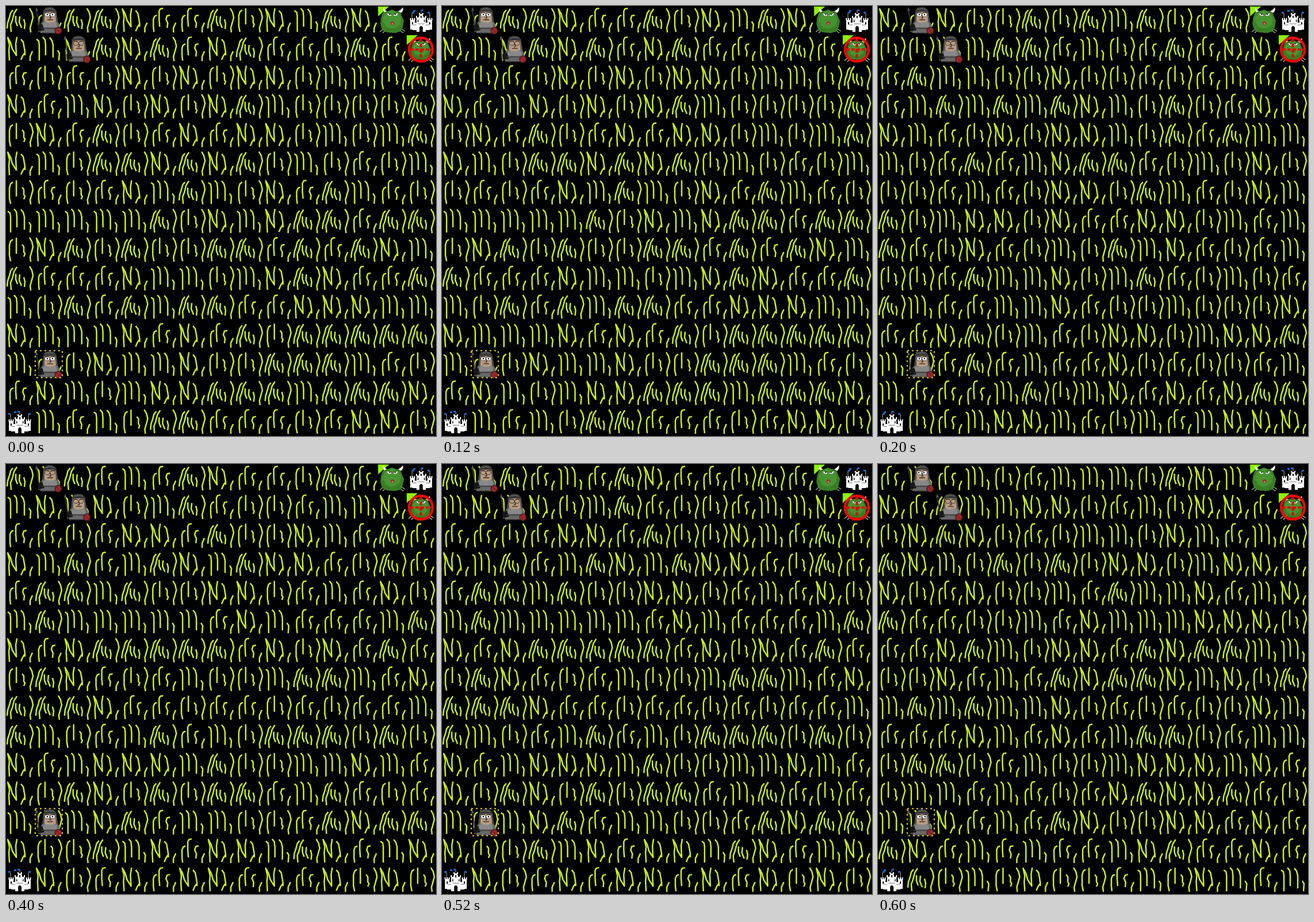
Animation of 748x748 px, one loop 0.8 s. Source, as an HTML page with a canvas:

```html
<!DOCTYPE html>
<html lang="en">
<head>
<meta charset="utf-8">
<title>Battle field</title>
<style>
  html, body { margin: 0; width: 100%; height: 100%; overflow: hidden; background: #000; }
  canvas { display: block; width: 748px; height: 748px; }
</style>
</head>
<body>
<canvas id="stage" width="748" height="748"></canvas>
<script>
const ctx = document.getElementById('stage').getContext('2d');
const SIZE = 748, CELLS = 15, PITCH = SIZE / CELLS;
const STEP = 200, STEPS = 4;

// Grass tufts, each on a 50 x 50 tile
const SHORT = 'M42 46L42 38L46 29';
const TALL = 'M41 4L45 11L47 20L44 31L42 38L43 46';
const TUFTS = [
  'M8 45L7 36L7 23L9 18L13 16M18 36L17 23L17 9L19 5L24 4M31 38L32 30L29 23L31 17L36 16' + SHORT,
  'M8 45L6 35L6 17L8 10L12 7M18 32L18 4M28 16L31 20L31 29L33 32L31 37' + TALL,
  'M6 45L5 28L6 18L3 5L8 14L11 25L18 36L17 16L19 4M26 8L30 13L32 24L33 31L29 37L26 44M33 30L33 36' + SHORT,
  'M2 39L3 29L6 20L8 12L12 7M9 45L8 33L11 25L14 13L19 5M17 17L17 27L20 35M24 18L23 28L27 38M31 23L33 31L32 40' + TALL,
  'M3 8L7 11L8 18L8 45M14 4L18 9L19 18L19 36M26 5L30 10L32 18L32 40M40 27L43 32L42 45'
].map(d => new Path2D(d));

function random(seed) {
  return () => {
    seed = (seed + 0x6d2b79f5) | 0;
    let n = Math.imul(seed ^ (seed >>> 15), 1 | seed);
    n ^= n + Math.imul(n ^ (n >>> 7), 61 | n);
    return ((n ^ (n >>> 14)) >>> 0) / 4294967296;
  };
}

function rect(color, x, y, w, h) {
  ctx.fillStyle = color;
  ctx.fillRect(x, y, w, h);
}

function fill(color, d) {
  ctx.fillStyle = color;
  ctx.fill(new Path2D(d));
}

function line(color, width, d) {
  ctx.strokeStyle = color;
  ctx.lineWidth = width;
  ctx.stroke(new Path2D(d));
}

function oval(color, x, y, rx, ry = rx) {
  ctx.fillStyle = color;
  ctx.beginPath();
  ctx.ellipse(x, y, rx, ry, 0, 0, 7);
  ctx.fill();
}

function at(col, row, draw) {
  ctx.save();
  ctx.translate(col * PITCH, row * PITCH);
  draw();
  ctx.restore();
}

function knight(look, shut) {
  line('#333', 2, 'M3 6L9 45');
  fill('#555', 'M1 9L3 2L6 8Z');
  fill('#4b4b4b', 'M13 30L15 11Q17 2 26 2Q36 2 38 11L41 30Z');
  fill('#686868', 'M10 47L9 35Q11 27 18 26H36Q43 28 44 36L43 47Z');
  fill('#888', 'M15 29Q26 25 38 29L39 37H14Z');
  fill('#171717', 'M5 34L13 31L17 42L6 44Z');
  fill('#b89b82', 'M17 10H36L37 27Q27 31 17 27Z');
  fill('#383838', 'M14 11Q17 2 26 2Q36 2 39 11L35 10H18Z');
  line('#777', 1, 'M19 6Q26 3 34 6');
  for (const x of [22, 31]) {
    oval('#302820', x, 15, 4.6, 4);
    oval(shut ? '#b89b82' : '#fff', x, 15, 3.8, 3.2);
    if (!shut) oval('#111', x + look, 15, 1.3);
  }
  line('#30251d', 1.3, 'M17 11L25 12M28 12L36 11M27 16L28 21L25 21M22 24H32');
  line('#3b3b3b', 1.5, 'M12 39H42M13 47H42');
  oval('#471818', 41, 43, 6.5);
  oval('#9e272d', 41, 43, 5);
  line('#471818', 1, 'M38 40L44 46');
}

function monster(scale) {
  fill('#8cf500', 'M-1 1H18L-1 18Z');
  line('#aaa792', 1.5, 'M2 45L9 39M7 47L13 41M35 41L43 47M37 38L46 44');
  ctx.save();
  ctx.translate(23, 26);
  ctx.scale(scale, scale);
  fill('#398024', 'M-16 -13L-13 -18L-7 -17L0 -20L7 -17L14 -17L17 -9L21 0L19 10L16 18L6 21L-8 20L-17 16L-20 5L-19 -5Z');
  oval('#479331', 0, -2, 16, 15);
  line('#2f701f', 1, 'M-15 3L-12 7M-11 14L-6 17M8 16L14 12M14 0L18 3');
  fill('#f4f4e8', 'M-13 -15Q-17 -18 -14 -24Q-13 -19 -9 -17ZM11 -17Q16 -19 19 -24Q21 -18 16 -14Z');
  fill('#fff', 'M-9 -14L0 -11Q-3 -7 -7 -10ZM2 -11L11 -14L9 -10Q5 -7 2 -11Z');
  line('#204912', 1.2, 'M-10 -15L0 -11M2 -11L12 -15');
  oval('#111', -4, -11, 1);
  oval('#111', 6, -11, 1);
  oval('#8c3427', 1, 4, 3.5, 3);
  oval('#d48a72', 1, 5, 1.8, 1.3);
  ctx.restore();
}

function target() {
  ctx.strokeStyle = '#f00808';
  ctx.lineWidth = 4.5;
  ctx.beginPath();
  ctx.arc(23.5, 26, 20.5, 0, 7);
  ctx.stroke();
  ctx.setLineDash([6, 3]);
  line('#e00808', 4, 'M23.5 7V45M5 26H43');
  ctx.setLineDash([]);
}

function castle(wave) {
  line('#aaa', 1, 'M8 22V12M24 13V7M39 22V12');
  [[8, 10], [14, 7], [24, 6], [39, 10]].forEach(([x, y], i) =>
    rect('#1769cf', x - ((wave + i) % 2 ? 4 : 0), y, 4, 3));
  rect('#fff', 9, 29, 30, 13);
  for (const x of [5, 35]) {
    rect('#fff', x, 24, 8, 17);
    for (let i = 0; i < 3; i++) rect('#fff', x + i * 3.5 - 0.5, 21, 2, 4);
    rect('#111', x + 3, 28, 2, 4);
  }
  for (const x of [16, 27]) {
    rect('#fff', x, 20, 5, 25);
    rect('#fff', x - 1, 17, 2, 4);
    rect('#fff', x + 4, 17, 2, 4);
    rect('#111', x + 2, 24, 1.5, 4);
  }
  rect('#fff', 21, 14, 6, 29);
  rect('#fff', 20, 12, 2, 3);
  rect('#fff', 26, 12, 2, 3);
  rect('#111', 23, 17, 2, 4);
  fill('#111', 'M21 45V37Q24 32 27 37V45Z');
  line('#777', 1, 'M9 33H16M32 33H39M18 31H30');
}

function selection() {
  ctx.setLineDash([3, 5]);
  ctx.strokeStyle = '#f2dc16';
  ctx.lineWidth = 2;
  ctx.strokeRect(1, 1, 47, 47);
  ctx.setLineDash([]);
}

function draw(step) {
  rect('#000', 0, 0, SIZE, SIZE);
  const next = random(71 + step * 997);
  ctx.lineJoin = 'round';
  ctx.strokeStyle = '#caef20';
  ctx.lineWidth = 2.5;
  for (let row = 0; row < CELLS; row++) {
    for (let col = 0; col < CELLS; col++) {
      const tuft = TUFTS[Math.floor(next() * TUFTS.length)];
      at(col, row, () => ctx.stroke(tuft));
    }
  }
  // The keeps and monsters stand on bare ground
  for (const [col, row] of [[13, 0], [14, 0], [14, 1], [0, 14]]) {
    at(col, row, () => rect('#000', 0, 0, 48, 48));
  }
  at(1, 0, () => knight(step === 3 ? -1 : 0, step === 2));
  at(2, 1, () => knight(0, true));
  at(1, 12, () => { knight(step === 3 ? 1 : 0, false); selection(); });
  at(13, 0, () => monster(1));
  at(14, 1, () => { monster(0.85); target(); });
  at(14, 0, () => castle(step));
  at(0, 14, () => castle(step + 1));
}

let shown = -1;
function tick(now) {
  const step = Math.floor(now / STEP) % STEPS;
  if (step !== shown) draw(shown = step);
  requestAnimationFrame(tick);
}
tick(performance.now());
</script>
</body>
</html>
```
